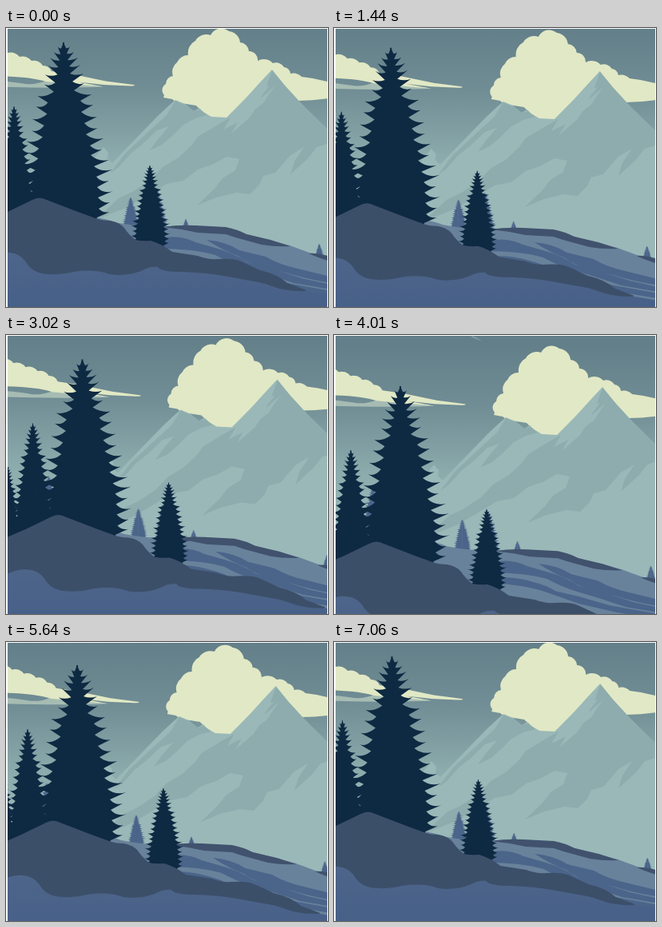
These frames come from a looping animation (403x349 px, 7450 ms). An HTML page without scripts:

```html
<!DOCTYPE html>
<html lang="en">
<head>
<meta charset="utf-8">
<title>Mountain parallax</title>
<style>
  @property --x { syntax: "<number>"; inherits: true; initial-value: 0; }
  @property --y { syntax: "<number>"; inherits: true; initial-value: 0; }

  html, body { margin: 0; width: 100%; height: 100%; overflow: hidden; background: #fff; }
  svg { display: block; width: 403px; height: 349px; }

  /* The view drifts on two axes; each layer follows by its own depth. */
  .scene {
    animation: drift-x 7450ms infinite, drift-y 7450ms infinite;
    animation-timing-function: cubic-bezier(.37, 0, .63, 1);
  }
  .layer {
    transform: translate(calc(var(--x) * var(--depth) * 1px), calc(var(--y) * var(--depth) * 1px));
  }
  .sky, .peaks { --depth: .28; }
  .streaky { --depth: .33; }
  .far-trees { --depth: .41; }
  .valley { --depth: .46; }
  .front { --depth: 1; }

  @keyframes drift-x {
    0% { --x: 0; }
    10.2% { --x: 8; }
    26.71% { --x: -7; }
    40.54% { --x: 23.5; }
    53.83% { --x: 11; }
    75.7% { --x: 17; }
    94.77%, 100% { --x: .5; }
  }
  @keyframes drift-y {
    0% { --y: 0; }
    10.2% { --y: 6.5; }
    26.71% { --y: 7; animation-timing-function: cubic-bezier(.4, 0, .7, .8); }
    40.54% { --y: 12.5; }
    53.83% { --y: 46; animation-timing-function: cubic-bezier(.4, 0, .7, .9); }
    75.7% { --y: 11; animation-timing-function: cubic-bezier(.3, .3, .6, 1); }
    94.77%, 100% { --y: 0; }
  }

  .cloud { fill: #e1e8c5; }
  .wisp { fill: #a6bcb3; }
  .rock { fill: #9ab8b8; }
  .shade { fill: #8eacad; }
  .meadow { fill: #69829b; }
  .ridge { fill: #40526d; }
  .streak, .far-trees { fill: #4b648a; }
  .hill { fill: #3c4f69; }
  .trees { fill: #0e2942; }
</style>
</head>
<body>
<svg viewBox="0 0 403 349">
  <defs>
    <clipPath id="stage"><path d="M2 1H402V349H2Z"/></clipPath>
    <linearGradient id="air" gradientUnits="userSpaceOnUse" x1="0" y1="0" x2="0" y2="210">
      <stop offset="0" stop-color="#637f89"/>
      <stop offset=".35" stop-color="#708c94"/>
      <stop offset=".75" stop-color="#8baaab"/>
      <stop offset="1" stop-color="#98b7b6"/>
    </linearGradient>
    <linearGradient id="ground" gradientUnits="userSpaceOnUse" x1="0" y1="280" x2="0" y2="350">
      <stop offset="0" stop-color="#4e658a"/>
      <stop offset="1" stop-color="#476088"/>
    </linearGradient>

    <!-- One side of a fir: each branch sags out to a raised tip, then cuts back in. -->
    <path id="half" d="M-1 0H0L3 7Q6 8 8 5L4 14Q9 15 13 12L5 22Q12 23 18 19L7 30Q15 32 21 28L8 39
      Q17 42 25 39L11 49Q19 54 26 51L13 60Q24 67 35 65L21 73Q27 80 37 78L22 87Q32 95 42 93L26 101
      Q34 110 43 107L28 115Q38 123 50 120L33 129Q40 136 48 134L34 141Q44 150 57 147L38 155
      Q48 163 61 159L41 168Q48 176 57 173L42 181Q50 190 62 186L43 194Q50 202 58 200L44 208
      Q50 214 58 212L42 219 38 228H-1Z"/>
    <g id="tree">
      <use href="#half"/>
      <use href="#half" transform="scale(-.93 1.03)"/>
    </g>
  </defs>

  <g class="scene" clip-path="url(#stage)">
    <g class="layer sky">
      <path fill="url(#air)" d="M-30-40H440V400H-30Z"/>
      <path fill="#7f9aa0" d="M168-13Q178-9 182-5L177-7Q169-9 168-13Z"/>
      <path class="cloud" d="M198 84A9 9 0 0 1 200 70A10 10 0 0 1 209 60A15 15 0 0 1 214 43A15 15 0 0 1 228 34
        A17 17 0 0 1 237 16A16 16 0 0 1 256 9A15 15 0 0 1 279 4A16 16 0 0 1 293 18A12 12 0 0 1 304 29
        A11 11 0 0 1 315 41A16 16 0 0 1 334 44A12 12 0 0 1 348 49A9 9 0 0 1 356 57Q364 55 370 61L384 63L425 72
        V84Q395 91 365 91L330 120H268Q250 112 242 101L238 97L213 93L208 89L197 87Z"/>
    </g>

    <g class="layer streaky">
      <path class="wisp" d="M-20 65Q8 67 25 70Q38 71 50 66L122 73.5Q60 76 -20 73Z"/>
      <path class="cloud" d="M-20 27A18 18 0 0 1 2 31A14 14 0 0 1 17 36A14 14 0 0 1 32 41A13 13 0 0 1 46 47
        A12 12 0 0 1 57 54L84 58L125 66.5L160 71Q164 72.5 155 72.5L122 71L90 67.5L122 73.5L82 70L50 67Q28 60 -20 60Z"/>
    </g>

    <g class="layer peaks">
      <path class="rock" d="M70 215L108 166 122 149 128 156 127 163 134 170V220Z"/>
      <path class="rock" d="M60 240L130 172 158 143 190 110 205 96 212 90 224 95 235 104 242 100 247 105 257 111
        276 112 300 88 318 68 333 52 349 72 371 96 440 164V340H60Z"/>
      <path class="shade" d="M333 53L349 72 371 96 425 149 402 145 389 149 378 163 356 183 361 167 373 149 356 159
        337 181 322 185 317 196 305 208 288 206 263 212 239 222 261 201 271 188 287 178 292 164 276 161
        258 171 240 177 222 191 201 195 176 210 150 225 112 240 141 213 158 205 181 190 196 174 216 162
        232 147 240 136 265 121 281 112 272 127 290 118 282 132 305 112 314 98 325 90 319 86 330 72 326 73Z"/>
      <path class="shade" d="M212 91L226 97 235 104 243 102 252 109 237 113 222 121 208 135 195 146 180 153
        191 138 204 123 189 128 170 146 156 157 141 174 130 182 149 157 179 129 201 109Z"/>
      <path class="rock" d="M333 53L323 77 311 91 297 99 283 112 276 113 300 88Z"/>
      <path class="rock" d="M337 72L329 83 322 94 310 103 321 86Z"/>
    </g>

    <g class="layer far-trees">
      <use href="#tree" transform="translate(44 172) scale(.27 .28)"/>
      <use href="#tree" transform="translate(156 212) scale(.19 .18)"/>
      <use href="#tree" transform="translate(189 203) scale(.23 .24)"/>
      <use href="#tree" transform="translate(225 239) scale(.08 .06)"/>
      <use href="#tree" transform="translate(392 270) scale(.11 .09)"/>
    </g>

    <g class="layer valley">
      <path class="meadow" d="M60 236Q120 234 136 243Q170 250 205 248L275 251L355 272L385 283L430 296V400H60Z"/>
      <path class="ridge" d="M196 249Q215 246 237 247L275 249Q290 252 301 258L331 265L356 273Q338 274 320 271
        L298 265Q286 262 275 258L240 256L220 252Z"/>
      <path class="ridge" d="M379 282Q390 280 430 293V298Q395 290 379 282Z"/>
      <path class="streak" d="M251 265Q275 267 292 278L325 286Q342 296 365 301L430 317V322
        Q385 317 350 306L320 299Q300 293 290 285Q271 278 251 265Z"/>
      <path class="streak" d="M190 264Q215 257 237 268L265 276Q286 282 302 293L330 300L370 313L430 326V331
        L360 319L330 309L300 300Q278 293 262 284Q235 276 190 276Z"/>
      <path class="streak" d="M190 283Q220 280 245 288Q262 292 272 299L302 306L340 317L430 333V339
        L350 326L302 315L262 301Q235 291 190 289Z"/>
    </g>

    <g class="layer front">
      <g class="trees">
        <use href="#tree" transform="translate(-22 150) scale(.32 .45)"/>
        <use href="#tree" transform="translate(10 98) scale(.48 .62)"/>
        <use href="#tree" transform="translate(72 18)"/>
        <use href="#tree" transform="translate(180 172) scale(.42 .455)"/>
      </g>
      <path class="hill" d="M-40 250L-21 240L2 230L33 215Q42 210 51 215L90 230L112 238Q120 241 130 241
        Q142 243 148 250Q153 258 162 265Q170 267 181 266Q195 270 208 280L240 285Q252 290 266 289
        Q285 288 294 292L318 303Q340 308 352 319L376 328L362 345H-40Z"/>
      <path fill="url(#ground)" d="M-40 290L-21 286Q-8 280 4 281Q19 282 27 296Q36 308 55 308Q70 309 85 305
        Q110 301 130 308Q150 311 169 304Q180 298 190 299Q194 305 220 305Q250 306 272 310L305 316
        Q320 318 333 323Q350 330 376 329L430 338V420H-40Z"/>
    </g>
  </g>
</svg>
</body>
</html>
```
